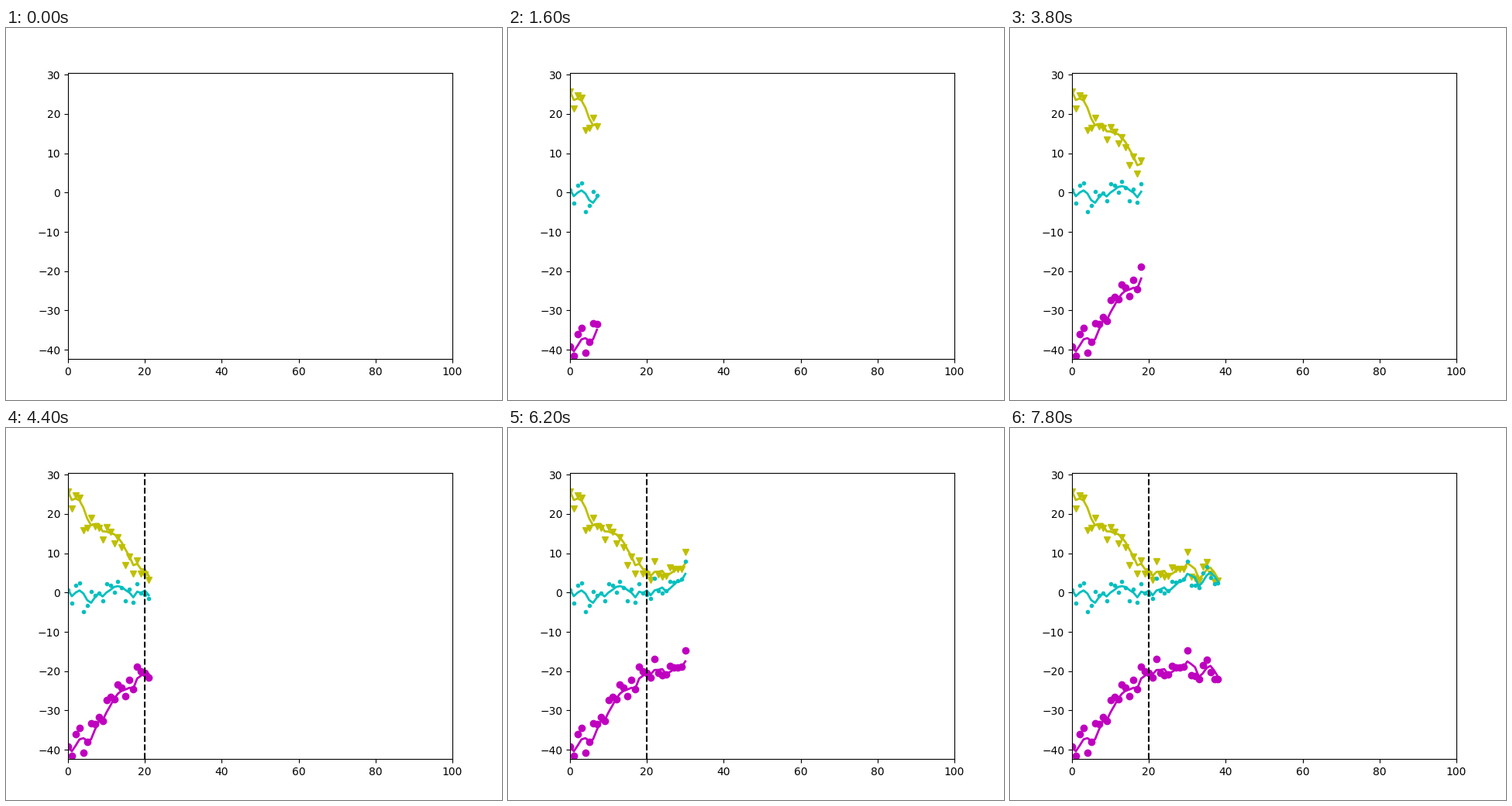
These frames come from a looping animation (640 by 480 pixels, 8 s). A matplotlib script:

```python
import numpy as np
import matplotlib.pyplot as plt
from matplotlib.animation import FuncAnimation

FRAMES, INTERVAL = 40, 200
BREAK, TOTAL = 20, 100

x = np.arange(TOTAL)
noise = np.random.default_rng(42).normal(0, 2.5, TOTAL)


def trend(start, middle, end):
    """Straight run to the break, then another one to the end."""
    return np.concatenate((np.linspace(start, middle, BREAK),
                           np.linspace(middle, end, TOTAL - BREAK)))


def trailing_mean(values, width=3):
    return np.array([values[max(0, i - width + 1):i + 1].mean()
                     for i in range(len(values))])


fig, ax = plt.subplots(figsize=(6.4, 4.8), dpi=100)
ax.set_xlim(0, TOTAL)
ax.set_ylim(-42.38, 30.53)

series = []
for levels, color, marker in [((25, 5, 5), "y", "v"),
                              ((0, 0, 20), "c", "."),
                              ((-40, -20, -20), "m", "o")]:
    data = trend(*levels) + noise
    points, = ax.plot([], [], color + marker)
    curve, = ax.plot([], [], color + "-", lw=2)
    series += [(points, data), (curve, trailing_mean(data))]

break_line = ax.axvline(BREAK, color="k", ls="--", visible=False)


def update(count):
    for artist, values in series:
        artist.set_data(x[:count], values[:count])
    break_line.set_visible(count > BREAK)
    return [artist for artist, _ in series] + [break_line]


anim = FuncAnimation(fig, update, frames=FRAMES, interval=INTERVAL,
                     init_func=lambda: update(0), repeat=True, repeat_delay=0)
plt.show()
```
